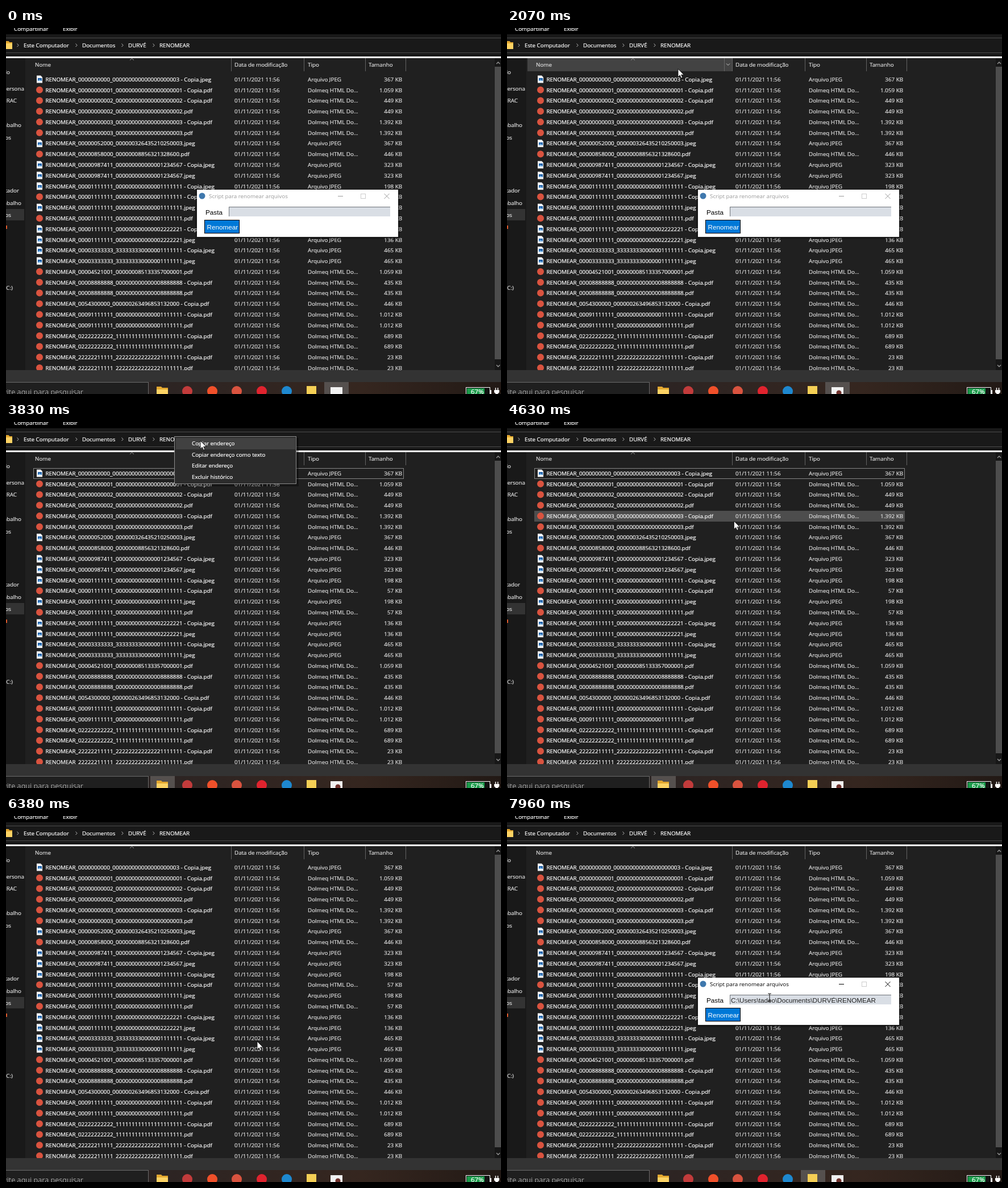
An HTML page for the animation above (8000 ms loop, 871 by 643 pixels).

```html
<!DOCTYPE html>
<html lang="pt-BR">
<head>
<meta charset="utf-8">
<title>Renomear arquivos</title>
<style>
html, body { margin: 0; width: 100%; height: 100%; overflow: hidden; background: #000; }
svg { display: block; width: 100vw; height: 100vh; }
text { font: 9.8px "Open Sans", "Noto Sans", sans-serif; fill: #fff; stroke: #fff; stroke-width: .22px; white-space: pre; }
.dim { fill: #dedede; stroke: #dedede; }
.end { text-anchor: end; }
.ui { font: 11.7px "Liberation Sans", Arial, sans-serif; stroke: none; }
.plain { stroke: none; }
.find { font-size: 12.6px; fill: #a8a8a8; stroke: none; }
rect { shape-rendering: crispEdges; }
</style>
</head>
<body>
<svg id="stage" viewBox="0 0 871 643" preserveAspectRatio="none"></svg>
<script>
const LOOP = 8000, ROW = 18.78, TOP = 90;
const DATE = '01/11/2021 11:56';

const text = (x, y, s, cls = '', more = '') => `<text x="${x}" y="${y}" class="${cls}" ${more}>${s}</text>`;
const rect = (x, y, w, h, fill, more = '') => `<rect x="${x}" y="${y}" width="${w}" height="${h}" fill="${fill}" ${more}/>`;
const dot = (x, y, r, fill) => `<circle cx="${x}" cy="${y}" r="${r}" fill="${fill}"/>`;
const line = (d, color, w = 1, more = '') => `<path d="${d}" fill="none" stroke="${color}" stroke-width="${w}" ${more}/>`;
const group = (id, body, more = '') => `<g id="${id}" ${more}>${body}</g>`;
const range = n => [...Array(n).keys()];

// code, number, kind (c = copy, j = jpeg, p = pdf), size, digits of both parts
const files = `0 3 cj 367 10 21
1 1 cp 1.059
2 2 cp 449
2 2 p 449
3 3 cp 1.392
3 3 p 1.392
52000 326435210250003 j 367
858000 8856321328600 p 446 11 20
987411 1234567 cj 323
987411 1234567 j 323
1111111 1111111 cj 198
1111111 1111111 cp 57
1111111 1111111 j 198
1111111 1111111 p 57
1111111 2222221 cj 136
1111111 2222221 j 136
3333333 333333330000001111111 cj 465
3333333 333333330000001111111 j 465
4521001 85133357000001 p 1.059
8888888 8888888 cp 435
8888888 8888888 p 435
54300000 263496853132000 cp 446 10 21
91111111 1111111 cp 1.012
91111111 1111111 p 1.012
2222222222 111111111111111111111 cp 689
2222222222 111111111111111111111 p 689
22222211111 222222222222221111111 cp 23
22222211111 222222222222221111111 p 23`.split('\n');

function fileRow(entry, i) {
  const [code, num, kind, size, a = 11, b = 21] = entry.split(' ');
  const y = TOP + ROW * i, base = (y + 3.8).toFixed(2), jpeg = kind.includes('j');
  const name = `RENOMEAR_${code.padStart(+a, '0')}_${num.padStart(+b, '0')}` +
    (kind[0] === 'c' ? ' - Copia' : '') + (jpeg ? '.jpeg' : '.pdf');
  const icon = jpeg
    ? `<path d="M54 ${y - 6.5}h7l3 3v10h-10z" fill="#f4f6f8"/>` + rect(55.5, y - 2, 7, 5, '#1d5fa8') +
      `<path d="M56 ${y + 3}l2.5-3 1.5 1.5 1-1 1.5 2.5z" fill="#7db9ea"/>`
    : dot(59, y, 6, '#d9533f');
  return icon + text(69.5, base, name) + text(402, base, DATE, 'dim') +
    text(531, base, jpeg ? 'Arquivo JPEG' : 'Dolmeq HTML Do...', 'dim') +
    text(697, base, size + ' KB', 'dim end');
}

function folder(x, y, w, h) {
  return `<path d="M${x} ${y}h${w * .4}l2 2h${w * .6 - 2}v${h}h${-w}z" fill="#e3a72f"/>` +
    rect(x, y + h * .3, w, h * .7 + 2, '#fcd364');
}

function topBar() {
  const crumbs = [[31, 'Este Computador'], [134, 'Documentos'], [215, 'DURVÉ'], [270, 'RENOMEAR']];
  return rect(0, 0, 871, 53, '#191919') + rect(0, 0, 871, 11, '#000') +
    text(14, 5, 'Compartilhar') + text(100, 5, 'Exibir') +
    rect(0, 17, 871, 1, '#4c4c4c') + rect(0, 43, 871, 1, '#4c4c4c') +
    group('crumb', rect(267, 18, 62, 25, '#4d4d4d')) + folder(0, 23, 11, 12) +
    crumbs.map(([x, s]) => line(`M${x - 11.5} 27.5l2.6 2.8-2.6 2.8`, '#b8b8b8') + text(x, 34, s)).join('') +
    rect(0, 50, 871, 2.5, '#fff');
}

function sidebar() {
  const items = [[7, 81, 'rápido'], [32, 109.5, 'Persona'], [19, 131, 'RAC'], [27, 174, 'Trabalho'],
    [9, 196, 'Documentos'], [23, 289, 'Computador'], [27, 310.5, 'Trabalho'], [9, 332, 'Documentos'], [12, 460, '(C:)']];
  return rect(0, 53, 34, 548, '#191919') + rect(0, 318, 32, 20, '#333') + rect(0, 347, 1.5, 6, '#d8582c') +
    items.map(([x, y, s]) => text(x, y, s, 'dim end')).join('');
}

function header() {
  const heads = [[51, 'Nome'], [402, 'Data de modificação'], [531, 'Tipo'], [638, 'Tamanho']];
  return group('headHover', rect(36, 53, 360, 23, '#434343') + rect(382, 53, 1, 23, '#666') +
      line('M386 62.5l3 3 3-3', '#ccc')) +
    [396, 524, 632, 703].map(x => rect(x, 53, 1, 23, '#636363')).join('') +
    line('M218 56.5l3.5-3 3.5 3', '#9a9a9a') +
    heads.map(([x, s]) => text(x, 68, s, 'dim')).join('');
}

function scrollbar() {
  return rect(860, 53, 11, 548, '#171717') + rect(860, 68, 11, 514, '#4d4d4d') +
    line('M863 63l3-3 3 3', '#9a9a9a', 1.3) + line('M863 592l3 3 3-3', '#9a9a9a', 1.3);
}

function taskbar() {
  const marks = [[319, '#c23b3b'], [363, '#f0502a'], [406, '#d9533f'], [450, '#e0232e'], [494, '#1e88cf']];
  return rect(0, 601, 871, 21, '#333') + rect(0, 622, 871, 21, 'url(#bar)') +
    rect(0, 622, 251, 21, '#1f1f1f') + rect(0, 622, 251, 1, '#6a6a6a') + rect(250, 622, 1, 21, '#6a6a6a') +
    text(136, 644, 'Digite aqui para pesquisar', 'find end') +
    group('active', rect(0, 622, 43, 21, '#55504e')) +
    folder(265, 630, 20, 15) +
    marks.map(([x, c]) => dot(x, 638, 9, c)).join('') +
    rect(529, 629, 17, 14, '#f5cf55') +
    rect(571, 631, 21, 12, '#f1f1f1') + group('rec', dot(584, 641, 4.5, '#70312c')) +
    rect(809.5, 631.5, 42, 14, '#111', 'stroke="#fff" stroke-width="1.5"') + rect(811, 633, 31, 10, '#1b9c4b') +
    rect(852, 636, 2, 7, '#fff') + text(818, 643, '67%', '', 'style="font-size:11.5px"') +
    line('M861.5 632v4M865.5 632v4', '#fff', 1.4) + `<path d="M859 636h9v4l-3 3h-3l-3-3z" fill="#fff"/>`;
}

// Colour of the caption follows the group's color value.
function dialog() {
  return rect(336, 284, 354, 83, '#fff') +
    dot(345, 295, 5.5, '#3f78ad') +
    text(357, 299, 'Script para renomear arquivos', 'plain', 'style="fill:currentColor"') +
    line('M584 295.5h9M665.5 291l9 9M674.5 291l-9 9', 'currentColor') +
    rect(624.5, 291.5, 8, 8, 'none', 'stroke="#ccc"') +
    text(351, 327.5, 'Pasta', 'ui', 'style="fill:#000"') +
    rect(392, 314, 284, 17, '#d9dee5') + rect(392, 314, 284, 1, '#6e7378') + rect(392, 314, 1, 17, '#6e7378') +
    rect(349, 337, 62, 24, '#000') + rect(350, 338, 60, 22, '#0078d7') +
    text(353.5, 353.5, 'Renomear', 'ui');
}

function menu() {
  const items = ['Copiar endereço', 'Copiar endereço como texto', 'Editar endereço', 'Excluir histórico'];
  return rect(299, 28, 216, 85, '#000', 'opacity=".35"') +
    rect(296.5, 25.5, 214, 83, '#2b2b2b', 'stroke="#8c8c8c"') +
    rect(299, 28, 210, 19.6, '#414141', 'id="pick"') +
    items.map((s, i) => text(327, 41 + 19.7 * i, s)).join('');
}

function miniList(x, y, h, n) {
  return range(n).map(i => {
    const ry = y + h * i / n;
    return line(`M${x} ${ry}h${44 + i * 7 % 3 * 4}`, '#c4c4c4', 1.3, 'stroke-dasharray="4 .5 2 .4"') +
      line(`M${x + 56} ${ry}h19M${x + 81} ${ry}h${i % 3 ? 20 : 15}M${x + 113} ${ry}h7`, '#8a8a8a', 1.1, 'stroke-dasharray="3 .6"');
  }).join('');
}

function switcher() {
  const explorer = folder(26, 238, 11, 12) + text(48, 249, 'RENOMEAR') +
    rect(23, 262, 183, 95, '#0c0c0c') + rect(23, 262, 183, 1.5, '#24527c') + rect(23, 270, 183, 1, '#555') +
    miniList(44, 276, 78, 26) +
    range(14).map(i => rect(27, 277 + i * 4.6, 2, 2, i % 3 ? '#c49a3d' : '#3d7fb8') + rect(31, 277 + i * 4.6, 8, 1, '#777')).join('') +
    rect(167, 272, 1, 82, '#444') + rect(175, 313, 27, 1, '#aaa');
  const recorder = rect(218, 239, 20, 11, '#eee') + text(243, 249, 'ScreenToGif') +
    rect(217.5, 260, 122, 97, 'none', 'stroke="#eee"') + rect(217, 259, 123, 4, '#f5f5f5') +
    rect(326, 260, 5, 2, '#c33') + rect(217, 353, 123, 4.5, '#f5f5f5') + rect(219, 355, 20, 1, '#888') + rect(310, 355, 27, 1, '#777');
  const script = dot(362, 245, 9, '#3f78ad') + text(377, 249, 'Script para renomear arquivos') +
    `<g transform="translate(352 260) scale(.7345) translate(-336 -284)" color="#8f8f8f">${dialog()}</g>`;
  const video = dot(634, 245, 9, '#f0502a') + text(649, 249, '(9)') + dot(671, 245.5, 5, '#d8d8d8') + text(678, 249, 'COMO CRIAR um...') +
    rect(625, 260, 179, 98, '#121216') + rect(625, 260, 179, 5, '#2c2438') + rect(625, 266, 179, 4, '#26262b') +
    rect(631, 274, 122, 70, '#1a1725') + rect(643, 285, 72, 50, '#e9e9ec') + rect(665, 301, 27, 18, '#1d2028') +
    rect(643, 326, 72, 8, '#262b2d') + range(7).map(i => rect(645 + i * 10, 328, 7, 4, '#789')).join('') +
    rect(736, 330, 12, 14, '#6c5650') + rect(633, 348, 62, 1.2, '#aaa') + rect(633, 353, 40, 1, '#777') +
    range(9).map(i => rect(756, 281 + i * 8.5, 14, 6.5, ['#8d8088', '#a8937b', '#60808a'][i % 3]) +
      rect(773, 282 + i * 8.5, 18 + i * 5 % 9, 1.2, '#bbb') + rect(773, 285 + i * 8.5, 12, 1, '#777')).join('');
  const page = dot(826, 245, 9, '#f0502a') + text(841, 249, 'ScreenToGif') +
    rect(816, 262, 55, 95, '#f6f7f9') + rect(816, 262, 55, 6, '#25222d') + rect(816, 268, 55, 6, '#38363f') +
    rect(816, 274, 55, 46, '#1b78d0') + rect(849, 281, 22, 1, '#6fb0e8') + dot(868, 298, 3.5, '#cfe4f7') + rect(862, 325, 9, 3, '#4aa2e8');
  return rect(0, 208, 871, 174, '#191919', 'opacity=".87"') + explorer + recorder + script + video + page +
    rect(213, 230, 132, 132, 'none', 'id="frame" stroke="#fff" stroke-width="2"');
}

const stage = document.getElementById('stage');
stage.innerHTML = `<defs><linearGradient id="bar"><stop offset=".3" stop-color="#2c2423"/>
  <stop offset=".72" stop-color="#35261f"/><stop offset="1" stop-color="#221915"/></linearGradient></defs>` +
  rect(0, 0, 871, 643, '#202020') + topBar() + sidebar() + header() +
  rect(48, 0, 652, ROW, '#4d4d4d', 'id="hover"') + files.map(fileRow).join('') +
  rect(48.5, 81.5, 651, 18, 'none', 'id="focus" stroke="#858585"') +
  scrollbar() + taskbar() +
  group('dialog', rect(333, 283, 360, 88, '#000', 'opacity=".25"') + dialog() +
    text(394, 327.5, 'C:\\Users\\tadeo\\Documents\\DURVÉ\\RENOMEAR', 'ui', 'id="path" style="fill:#222"') +
    rect(394, 316, 1, 13, '#000', 'id="caret"')) +
  group('menu', menu()) + group('switcher', switcher()) +
  group('arrow', '<path d="M0 0v14.3l3.3-3.1 2.2 5 2.3-1-2.2-4.9h4.7z" fill="#fff" stroke="#000" stroke-width=".8"/>') +
  group('beam', line('M-3 -7h2l1 1 1-1h2M0 -6v12M-3 7h2l1-1 1 1h2', '#1a1a1a', 1.1));

const el = {};
stage.querySelectorAll('[id]').forEach(n => el[n.id] = n);
const show = (id, on) => el[id].setAttribute('display', on ? 'inline' : 'none');
const move = (id, x, y) => el[id].setAttribute('transform', `translate(${x.toFixed(2)} ${y.toFixed(2)})`);
const within = (t, a, b) => t >= a && t < b;

// time, x, y of the pointer
const track = [[70, 862, 632], [420, 735, 480], [820, 608, 351], [1300, 535, 319], [1440, 533, 318], [1650, 506, 287],
  [1850, 400, 165], [2070, 301, 72], [2410, 297, 26], [3000, 297, 26], [3620, 342, 33], [3900, 342, 33],
  [4200, 358, 58], [4430, 375, 80], [4900, 432, 300], [5240, 451, 420], [5580, 451, 420], [6380, 442, 396],
  [6500, 442, 394], [7100, 462, 319], [8000, 462, 319]];

function pointer(t) {
  const i = track.findIndex(p => p[0] > t);
  if (i <= 0) return null;
  const [a, b] = [track[i - 1], track[i]], k = (t - a[0]) / (b[0] - a[0]);
  return { x: a[1] + (b[1] - a[1]) * k, y: a[2] + (b[2] - a[2]) * k };
}

function render(t) {
  const p = pointer(t), at = p || { x: -50, y: -50 };
  const dialogOn = t < 2540 || t >= 6460, menuOn = within(t, 2880, 4360), tabOn = within(t, 5030, 6310);
  const inBox = (x, y, x2, y2) => within(at.x, x, x2) && within(at.y, y, y2);
  const overDialog = dialogOn && inBox(336, 284, 690, 367);
  const beam = dialogOn && inBox(392, 313, 676, 332);

  show('dialog', dialogOn);
  el.dialog.setAttribute('color', t < 2540 ? '#9a9a9a' : '#000');
  show('path', t >= 7830);
  show('caret', within(t, 7350, 7830));

  const rowsLive = within(t, 70, 890) || within(t, 1650, 2480) || within(t, 4430, 5030) || t >= 6460;
  const row = Math.floor((at.y - TOP + ROW / 2) / ROW);
  show('hover', rowsLive && !overDialog && row >= 0 && inBox(48, 80, 700, 601));
  el.hover.setAttribute('y', (TOP - ROW / 2 + row * ROW).toFixed(2));
  show('headHover', t < 2480 && inBox(36, 53, 396, 77));
  show('focus', within(t, 2540, 5030));
  show('crumb', within(t, 2540, 2950));

  show('menu', menuOn);
  const item = Math.floor((at.y - 28) / 19.7);
  show('pick', item >= 0 && item < 4);
  el.pick.setAttribute('y', 28 + Math.max(0, item) * 19.7);

  show('switcher', tabOn);
  const next = t >= 5580;
  el.frame.setAttribute('x', next ? 347 : 213);
  el.frame.setAttribute('width', next ? 270 : 132);

  const tab = t < 2540 ? 560 : within(t, 2540, 5030) ? 254 : t >= 6460 ? 516.5 : -100;
  move('active', tab, 0);
  show('rec', t >= 140);

  show('arrow', p && !beam);
  show('beam', p && beam);
  move('arrow', at.x, at.y);
  move('beam', at.x, at.y);
}

function tick() {
  render(performance.now() % LOOP);
  requestAnimationFrame(tick);
}
tick();
</script>
</body>
</html>
```
